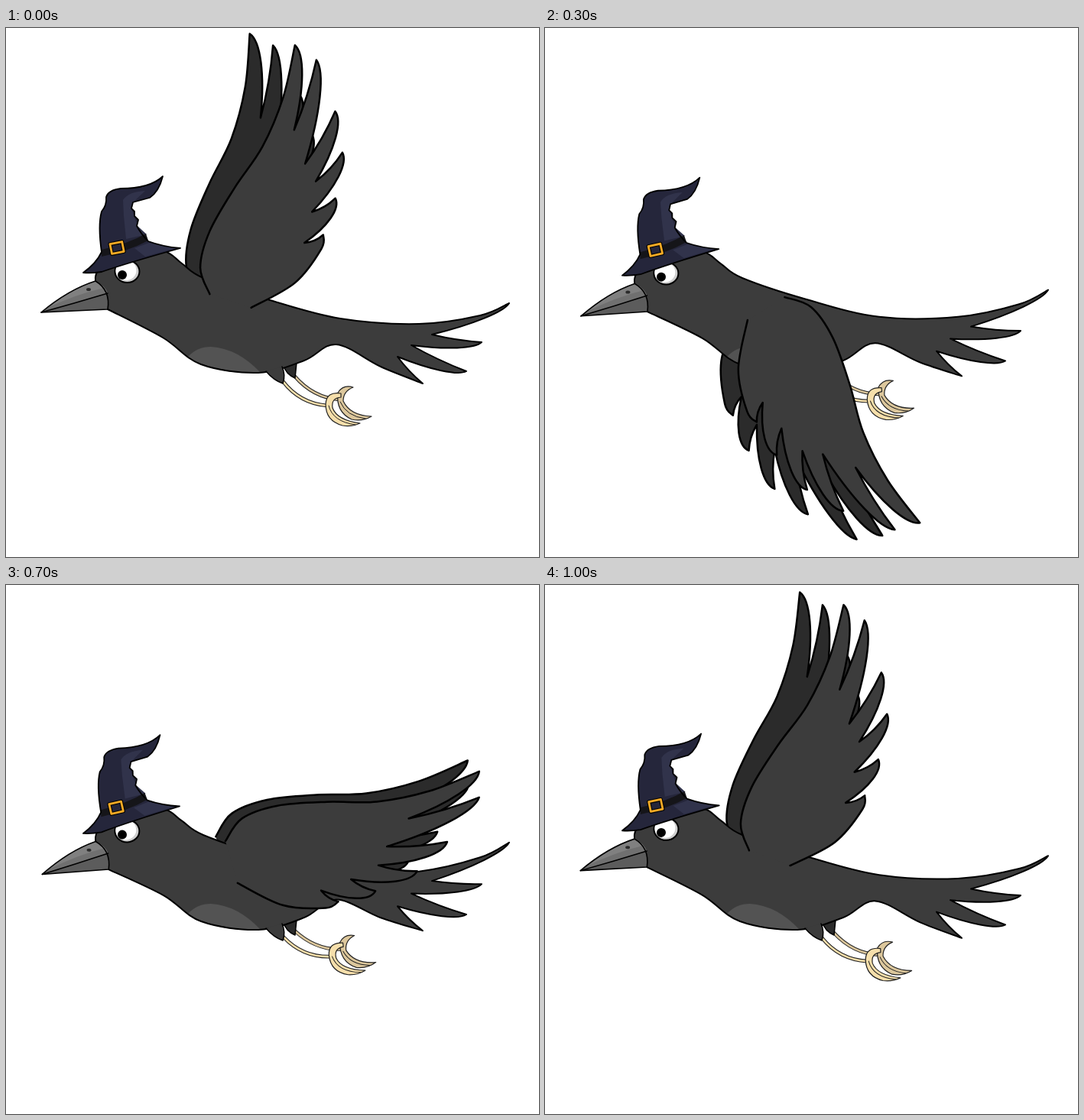
An HTML page with a canvas that plays this animation: 697 by 692 pixels, repeating every 1100 ms.

```html
<!DOCTYPE html>
<html lang="en">
<head>
<meta charset="utf-8">
<title>Flying crow</title>
<style>
html, body { margin: 0; width: 100%; height: 100%; overflow: hidden; background: #fff; }
canvas { display: block; }
</style>
</head>
<body>
<canvas id="stage" width="697" height="692"></canvas>
<script>
const ctx = document.getElementById('stage').getContext('2d');
const STEP = 100, STEPS = 11;
const DARK = '#2b2b2b', COAT = '#3c3c3c', INK = '#000';

const points = s => s.trim().split(/\s+/).map(p => p.split(',').map(Number));
const mix = (a, b, t) => a + (b - a) * t;
const clamp = v => Math.max(0, Math.min(1, v));

// A feathered part: front edge, tips and notches in turn, rear edge.
const plumage = (front, feathers, rear, bulge) =>
  ({ front: points(front), feathers: points(feathers), rear: points(rear), bulge });

// Polar: distance from the shoulder, degrees from the longest feather.
const WING = plumage(
  '26,-75 59,-51 98,-28 152,-11 211,-2 280,.5',
  '350,0 244,6.4 340,5.4 210,14.4 289,14.6 198,21.2 249,22.6 164,28 198,31 129,37 155,39.6',
  '143,45 93,58 32,84', 13);

const BODY = plumage(
  '117,333 122,316 165,292 207,292 230,308 258,327 342,355 437,380 540,387 620,376',
  '658,360 557,401 622,411 530,415 602,449 512,430 545,465',
  '490,443 432,414 390,435 330,451 255,440 205,405 133,368', 8);

// Wing beat: [step, degrees], straight in between.
const BEAT = [[0, -75.3], [3, 54.9], [4, 57.6], [9, -71], [STEPS, -75.3]];

function wingAngle(step) {
  const i = BEAT.findIndex(b => b[0] > step);
  const [s0, a0] = BEAT[i - 1], [s1, a1] = BEAT[i];
  return mix(a0, a1, (step - s0) / (s1 - s0));
}

// Smooth curve through points, the path being already at the first one.
function spline(path, p) {
  for (let i = 0; i < p.length - 1; i++) {
    const b = p[i], c = p[i + 1], a = p[i - 1] || b, d = p[i + 2] || c;
    path.bezierCurveTo(
      b[0] + (c[0] - a[0]) / 6, b[1] + (c[1] - a[1]) / 6,
      c[0] - (d[0] - b[0]) / 6, c[1] - (d[1] - b[1]) / 6, c[0], c[1]);
  }
}

// A point part of the way from a to b, moved sideways.
function beside(a, b, along, side) {
  const x = b[0] - a[0], y = b[1] - a[1], len = Math.hypot(x, y);
  return [a[0] + x * along - y / len * side, a[1] + y * along + x / len * side];
}

function trace({ front, feathers, rear, bulge }, place) {
  const path = new Path2D(), f = feathers.map(place), lead = front.map(place);
  path.moveTo(...lead[0]);
  spline(path, [...lead, f[0]]);
  for (let i = 0; i + 2 < f.length; i += 2) {
    const [tip, notch, next] = f.slice(i, i + 3);
    path.bezierCurveTo(...beside(tip, notch, .1, -bulge), ...beside(tip, notch, .5, -bulge), ...notch);
    path.quadraticCurveTo(...beside(notch, next, .5, bulge * .35), ...next);
  }
  spline(path, [f[f.length - 1], ...rear.map(place)]);
  return path;
}

const around = (x, y, angle) => ([r, deg]) => {
  const a = (angle + deg) * Math.PI / 180;
  return [x + r * Math.cos(a), y + r * Math.sin(a)];
};

// The head nods and the tail lifts; the belly stays.
const flex = k => ([x, y]) => {
  const nod = .034 * k * clamp((260 - x) / 110);
  return [x + nod * (y - 325), y - nod * (x - 283) - .115 * k * Math.max(0, x - 406)];
};

function paint(shape, fill, width = 0, ink = INK) {
  const path = typeof shape === 'string' ? new Path2D(shape) : shape;
  if (fill) { ctx.fillStyle = fill; ctx.fill(path); }
  if (width) { ctx.strokeStyle = ink; ctx.lineWidth = width; ctx.stroke(path); }
}

function disc(x, y, rx, ry, fill, width) {
  const path = new Path2D();
  path.ellipse(x, y, rx, ry, 0, 0, 2 * Math.PI);
  paint(path, fill, width);
}

function turned(x, y, angle, draw) {
  ctx.save();
  ctx.translate(x, y);
  ctx.rotate(angle);
  ctx.translate(-x, -y);
  draw();
  ctx.restore();
}

function leg(shin, foot, toes, color) {
  paint(shin, null, 4.6, '#222');
  paint(shin, null, 2.6, color);
  paint(foot, color, 1.2, '#222');
  paint(toes, null, 1, '#222');
}

function drawLegs() {
  leg('M377,455 Q402,484 436,486',
    'M454,470 Q441,466 434,477 Q431,502 452,512 Q466,515 478,508 Q450,507 441,488 Q441,475 454,470Z',
    'M437,489 Q445,508 470,511', '#dcc79c');
  leg('M362,462 Q384,491 420,494',
    'M438,478 Q419,475 418,492 Q418,514 440,520 Q452,522 463,517 Q433,513 427,497 Q425,484 438,483Z',
    'M422,494 Q427,515 457,519', '#f6dfab');
}

function drawHat() {
  const navy = '#25263b', light = '#31334b';
  const hat = `M101,320 Q118,308 125,293 Q120,258 125,240 Q132,232 131,221 Q134,212 150,210
    Q188,210 205,194 Q200,214 188,222 L166,228 L164,236 L168,240 L168,246 L173,251 L171,259
    Q177,270 186,279 Q205,286 228,288 Q160,307 125,319 Q112,321 101,320Z`;
  paint(hat, navy);
  paint('M182,213 Q160,214 153,225 L154,246 L157,276 L184,270 L172,259 L164,236 L166,228Z', light);
  paint('M168,288 L187,281 L222,288 L182,299Z', light);
  paint('M125,290 Q160,282 183,269 L186,278 Q160,292 125,299Z', '#151519');
  paint(hat, null, 1.8);
  turned(145, 287, -.2, () => {
    const buckle = 'M137,281 h16 v13 h-16Z';
    paint(buckle, navy, 5);
    paint(buckle, null, 2.8, '#f4aa25');
  });
}

function drawHead() {
  const beak = 'M46,372 Q82,342 117,331 Q137,343 133,368 Q90,370 46,372Z';
  paint(beak, '#5c5c5c');
  paint('M46,372 Q82,342 117,331 Q130,337 133,347 Q90,360 46,372Z', '#707070');
  paint('M52,367 Q84,342 117,331 Q124,334 128,340 Q92,348 52,367Z', '#808080');
  paint('M46,372 Q90,360 133,347', null, 1.5);
  paint(beak, null, 1.6);
  disc(108, 342, 3, 2, DARK);
  disc(158.5, 318.5, 16, 14.5, '#cfcfcf', 2);
  disc(157, 317, 13.5, 13, '#fff');
  disc(152, 323, 6, 6, INK);
  drawHat();
}

function draw(step) {
  const k = Math.min(step, STEPS - step) / 5;
  const angle = wingAngle(step);
  const body = trace(BODY, flex(k));
  ctx.clearRect(0, 0, 697, 692);
  ctx.lineJoin = ctx.lineCap = 'round';

  paint(trace(WING, around(277, 355, angle * 1.115 + .8)), DARK, 2.5);
  turned(352, 450, -.14 * k, drawLegs);
  paint('M362,440 Q366,453 378,458 L380,438Z', DARK, 1.5);
  paint(body, COAT);
  paint('M238,430 Q250,417 268,417 Q303,419 333,451 Q275,454 238,430Z', '#535353');
  paint(body, null, 2);
  paint('M340,449 Q350,461 362,465 Q366,454 361,443', COAT, 1.5);
  turned(283, 325, -.034 * k, drawHead);
  paint(trace(WING, around(289, 361, angle)), COAT, 2.5);
}

const start = performance.now();
let shown = -1;
function tick() {
  const step = Math.floor((performance.now() - start) / STEP) % STEPS;
  if (step !== shown) draw(shown = step);
  requestAnimationFrame(tick);
}
tick();
</script>
</body>
</html>
```
